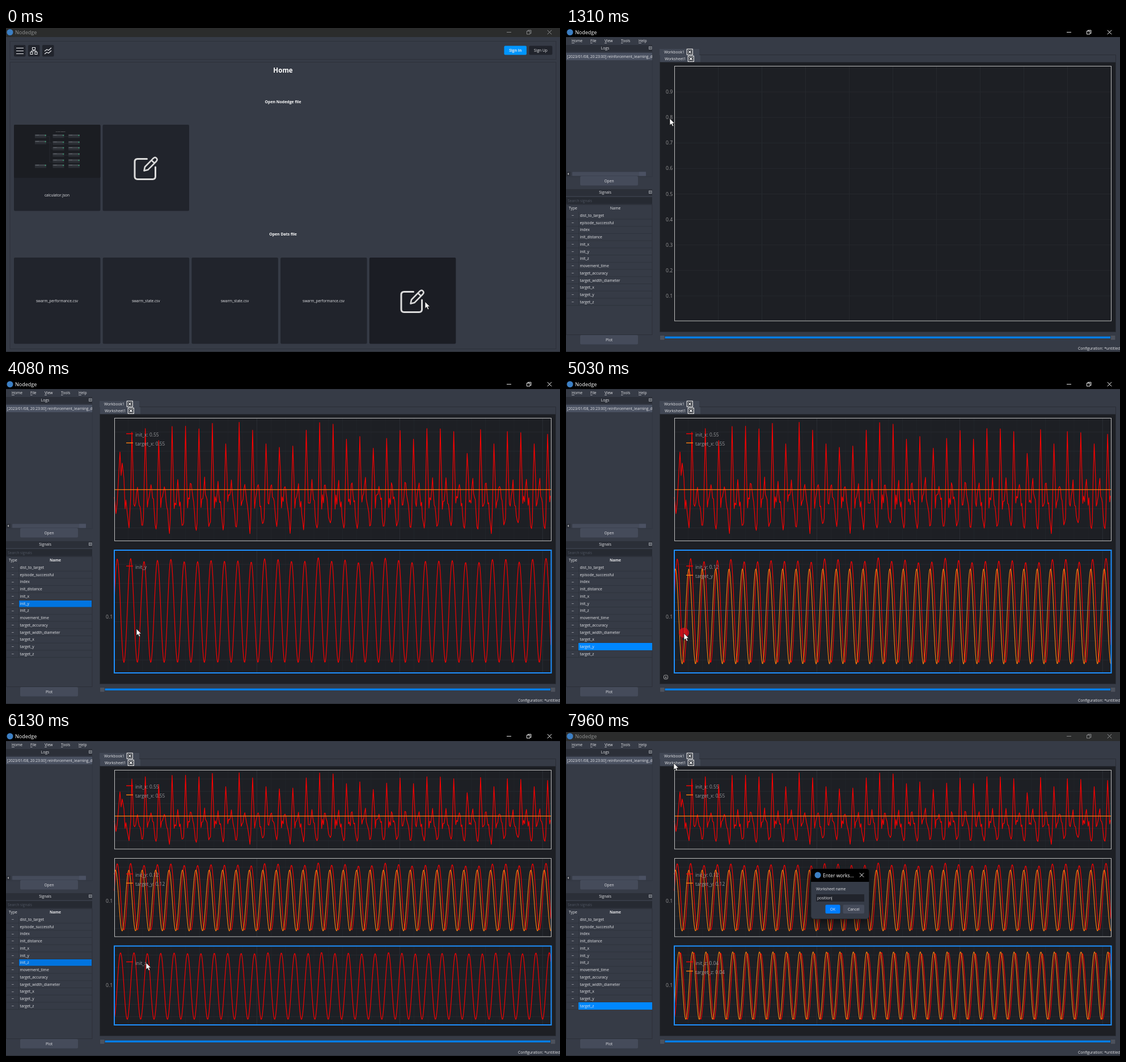
An HTML page for the animation above (8000 ms loop, 977x573 px).

```html
<!DOCTYPE html>
<html lang="en">
<head>
<meta charset="utf-8">
<title>Nodedge</title>
<style>
html, body { margin: 0; width: 100%; height: 100%; overflow: hidden; background: #363b46; }
svg { display: block; font-family: "Open Sans", "Noto Sans", sans-serif; }
text { white-space: pre; }
</style>
</head>
<body>
<svg id="stage" width="977" height="573" viewBox="0 0 977 573"></svg>
<script>
const LOOP = 8000, BG = '#363b46', CARD = '#21242c', BTN = '#454b5a', INK = '#e4e5e8', BLUE = '#1e90ff';

// Markup helpers
const rect = (x, y, w, h, fill, more = '') => `<rect x="${x}" y="${y}" width="${w}" height="${h}" fill="${fill}" ${more}/>`;
const text = (x, y, s, size, fill = INK, more = '') =>
  `<text x="${x}" y="${y + size * 0.36}" font-size="${size}" fill="${fill}" ${more}>${s}</text>`;
const mid = (x, y, s, size, fill, more = '') => text(x, y, s, size, fill, 'text-anchor="middle" ' + more);
const line = (d, color = INK, w = 1, more = '') => `<path d="${d}" fill="none" stroke="${color}" stroke-width="${w}" ${more}/>`;
const fill = (d, color) => `<path d="${d}" fill="${color}"/>`;
const dot = (x, y, r, color, more = '') => `<circle cx="${x}" cy="${y}" r="${r}" fill="${color}" ${more}/>`;
const frame = (x, y, w, h, color, w2 = 1, bg = 'none', r = 0) =>
  rect(x, y, w, h, bg, `stroke="${color}" stroke-width="${w2}" rx="${r}"`);
const button = (x, y, w, h, s, bg = BTN, more = '') =>
  rect(x, y, w, h, bg, 'rx="2"') + mid(x + w / 2, y + h / 2, s, 6.7, INK, more);
const cross = (x, y, r, color, w = 1) => line(`M${x - r} ${y - r}l${2 * r} ${2 * r}m0 ${-2 * r}l${-2 * r} ${2 * r}`, color, w);
const range = n => [...Array(n).keys()];
const BOLD = 'font-weight="700"';

function random(seed) {
  return () => (seed = (seed * 16807) % 2147483647) / 2147483647;
}

// Home page
function pen(x, y) {
  return `<g transform="translate(${x} ${y})">` +
    line('M23 4.5H6.5Q1.5 4.5 1.5 9.5V35.5Q1.5 40.5 6.5 40.5H33Q38 40.5 38 35.5V19', '#dcdcdc', 3, 'stroke-linecap="round"') +
    line('M18 25.5L19.5 18.5L34.5 3.2Q37.5 0.7 39.8 3.2Q42.2 5.8 39.8 8.5L24.8 23.8ZM31 7L36.5 12', '#dcdcdc', 2.6, 'stroke-linejoin="round"') + '</g>';
}

function thumb() {
  const node = (x, y) => rect(x, y - 2.5, 20, 6, '#2b2e34') + rect(x, y - 2.5, 20, 2.2, '#44484f') +
    dot(x + 18.5, y - 1, 0.9, '#2fae74') + text(x + 1.5, y - 1.3, 'Input', 2.2, '#a5a8ae');
  const ys = [191, 203, 213, 224, 235, 244];
  return rect(14, 171, 152.5, 94, '#1b1d22', 'rx="2"') + mid(96, 183, 'Calculator example', 1.9, '#c8c8c8') +
    line('M72 192H77V237H83M72 203H80V214H83M103 192H110M103 204H110M103 225H110', '#33363c', 0.5) +
    [191, 202, 244].map(y => node(51, y)).join('') + ys.map(y => node(82.5, y) + node(110, y)).join('');
}

function home() {
  let s = rect(0, 16, 977, 557, BG);
  s += frame(7, 23.5, 963, 32, '#2d313a', 1) + frame(7, 60.5, 963, 507, '#2d313a', 1);
  s += [14, 39, 64].map(x => rect(x, 30, 20.5, 20.5, CARD, 'rx="2"')).join('');
  s += line('M18 35.5H31M18 40.5H31M18 45.5H31', INK, 1.2);
  s += line('M46.5 34.5h5v4h-5zM43 42.5h4v4h-4zM51 42.5h4v4h-4zM49 38.5v2M45 42.5v-2h8v2', INK, 1.1);
  s += line('M68 41l4-3 3 1.5 5-4.5M68 46l4-3 3 1.5 5-4.5', INK, 1.2);
  s += button(878.5, 31.5, 39.5, 16, 'Sign In', '#0096ff', BOLD) + button(922.5, 31.5, 41, 16, 'Sign Up', CARD);
  s += mid(488.5, 74.5, 'Home', 11.6, '#fff', BOLD);
  s += mid(488.5, 130, 'Open Nodedge file', 6.95, '#fff', BOLD) + mid(488.5, 365, 'Open Dats file', 6.9, '#fff', BOLD);
  s += [14, 170.5].map(x => rect(x, 171, 152.5, 152.5, CARD, 'rx="2"')).join('');
  s += thumb() + mid(90, 295.5, 'calculator.json', 6.5) + pen(225.5, 227);
  ['swarm_performance.csv', 'swarm_state.csv', 'swarm_state.csv', 'swarm_performance.csv', ''].forEach((name, i) => {
    const x = 14 + i * 156.7;
    s += rect(x, 406, 152.5, 152.5, name ? CARD : '#1b1d24', 'rx="2"') + mid(x + 76, 483, name, 6.5);
  });
  return s + pen(695.5, 462) + rect(0, 572, 977, 1, '#272a31');
}

// Data window
const SIGNALS = ['dist_to_target', 'episode_successful', 'index', 'init_distance', 'init_x', 'init_y', 'init_z',
  'movement_time', 'target_accuracy', 'target_width_diameter', 'target_x', 'target_y', 'target_z'];

function shell() {
  let s = rect(0, 16, 977, 557, BG);
  [[10, 'Home'], [43, 'File'], [68, 'View'], [97, 'Tools'], [128, 'Help']].forEach(([x, m]) => {
    s += text(x, 23, `<tspan text-decoration="underline">${m[0]}</tspan>${m.slice(1)}`, 6.7);
  });
  [[36, 'Logs'], [291, 'Signals']].forEach(([y, name]) => {
    s += rect(0, y - 6, 152, 12, '#2b2f38') + mid(69, y, name, 6.7) +
      frame(146.5, y - 3, 4.5, 4.5, '#b5b8be', 0.8) + cross(148.7, y - 0.7, 1, '#b5b8be', 0.7);
  });
  s += frame(0.5, 43, 151.5, 220, '#313640', 0.8);
  s += rect(0, 254, 8, 8, '#2d313a') + fill('M5 256v4l-2.5-2z', '#bbb') + rect(11, 254.5, 130, 7, BTN, 'rx="1"') + rect(129, 254.5, 12, 7, '#4b5162');
  s += button(25, 262, 102, 16.5, 'Open') + rect(0, 299, 152, 12.5, '#262a32') + text(3, 305.5, 'Search signals', 6.5, '#4f5561');
  s += frame(0.5, 312.5, 151.5, 230, '#2c3039', 1) + button(25, 543, 102, 16.5, 'Plot');
  s += rect(165, 37, 70, 11, '#414754') + text(173, 42.5, 'Workbook1', 6.7) + rect(166, 48, 71, 12, '#414754') + text(174, 54.5, 'Worksheet1', 6.7);
  [[218.3, 42.3], [220.3, 54.5]].forEach(([x, y]) => { s += frame(x - 5, y - 5, 10, 10, '#e8e8e8', 1.2, '#33373f') + cross(x, y, 2.5, '#fff', 1.2); });
  s += line('M235 47.5H969.5V537', '#2a2e36') + rect(165.5, 60.5, 804, 477, '#1d1f24', 'stroke="#2a2e36"');
  s += rect(174, 545.5, 787, 3.5, '#007de6');
  s += [165, 960].map(x => frame(x + 0.5, 543.5, 8.5, 8.5, '#343943', 1, '#4d525d')).join('');
  return s + rect(0, 572, 977, 1, '#272a31');
}

function table(sel, strong) {
  let s = text(5, 319, 'Type', 6.7) + mid(87, 319, 'Name', 6.7, INK, sel ? BOLD : '') + line('M22.5 325V490', '#2d313a', 0.8);
  SIGNALS.forEach((name, i) => {
    const y = 331.6 + i * 12.72, top = Math.round(y - 6.5);
    s += line(`M0 ${y + 6.4}H152`, '#2d313a', 0.8);
    if (name === sel) s += strong ? rect(22, top, 130, 13, '#0087ff') : rect(23, top + 1, 128, 11.5, '#0074e0');
    s += mid(12, y, '~', 7.5) + text(24.5, y, name, 6.75);
  });
  return s;
}

// Curves in unit height; x in pixels
const PEAKS = [119, 106, 150, 98, 97, 107, 87, 162, 83, 112, 162, 175, 170, 112, 84, 90,
  145, 135, 178, 142, 113, 145, 106, 107, 117, 197, 110, 162, 117, 121, 162, 127];
// Rest of a period: offset, height, spread
const TAIL = [[2.2, 290, 15], [3.6, 388, 15], [5, 370, 22], [6.8, 365, 22], [8.4, 325, 22], [10, 302, 20], [11.4, 345, 20],
  [13, 375, 20], [14.4, 378, 20], [15.8, 420, 15], [17.4, 455, 12], [19, 470, 22], [20.4, 445, 12], [21.8, 300, 15]];

function spikes() {
  const rnd = random(41);
  const pts = [[191, 357], [194, 418], [196, 380], [201, 192], [203, 278], [205, 233], [208, 290], [210, 400], [211.5, 368], [214, 420], [217, 470], [220, 350]];
  PEAKS.forEach((top, i) => {
    const x = 222 + 23.65 * i;
    pts.push([x, top]);
    TAIL.forEach(([dx, y, n]) => pts.push([x + dx, y + (rnd() * 2 - 1) * n]));
  });
  return pts.filter(p => p[0] <= 961).map(([x, y]) => [x, (y - 67) / 451]);
}

function wave(peak, top, low, vary) {
  const rnd = random(7), tops = range(40).map(() => top + rnd() * vary);
  return range(771).map(i => {
    const a = (191 + i - peak) / 23.63, hi = tops[Math.round(a) + 2];
    return [191 + i, (hi + low) / 2 - (low - hi) / 2 * Math.cos(a * 2 * Math.PI)];
  });
}

const RED = '#ff0000', ORANGE = '#ff7f0e';
const CURVES = {
  init_x: spikes(), target_x: [[191, 0.583], [961, 0.583]],
  init_y: wave(196.2, 0.058, 0.915, 0.045), target_y: wave(193, 0.152, 0.927, 0),
  init_z: wave(202, 0.08, 0.93, 0.02), target_z: wave(199.5, 0.074, 0.93, 0)
};
const BOXES = [[[67, 451]], [[67, 217.5], [301, 217]], [[67, 140], [223, 139], [378.5, 139.5]]];

function plot(axis, top, h, legends, active) {
  let s = '';
  for (let x = 215.5, i = 0; x < 961; x += 25.2, i++) s += line(`M${x} ${top}v${h}`, i % 10 === 9 ? '#2b2e35' : '#212429', 1);
  range(6).forEach(i => { s += line(`M191 ${top + h * (0.115 + 0.156 * i)}H961`, '#26292f', 1); });
  legends.forEach(([name], i) => {
    const d = CURVES[name].map(([x, y]) => x.toFixed(1) + ' ' + (top + y * h).toFixed(1)).join('L');
    s += line('M' + d, i ? ORANGE : RED, 1.15, 'stroke-linejoin="round"');
  });
  s += active ? frame(191, top, 770.5, h, BLUE, 2) : frame(191.5, top + 0.5, 770, h - 0.5, '#bcbcbc', 1);
  legends.forEach(([name, val], i) => {
    const y = top + 28 + i * 16.3;
    s += line(`M212 ${y}h12`, i ? ORANGE : RED, 1.4) + text(228, y + 2, name + (val ? ': ' + val : ''), 8.4, '#96979b');
  });
  if (axis !== 'x') s += text(176, top + h * (axis === 'y' ? 0.545 : 0.5), '0.1', 8.6, '#969696');
  return s;
}

function emptyPlot() {
  let s = '';
  range(9).forEach(i => {
    const y = 113.1 + i * 45.1;
    s += line(`M${268.5 + i * 77} 68V517M192 ${y}H961`, '#25282d') + text(176, y, (0.9 - i / 10).toFixed(1), 8.6, '#969696');
  });
  return s + frame(191.5, 67.5, 770, 450.5, '#bcbcbc', 1);
}

// Each axis: [init shown, init value, target shown, target value]
const STEPS = { x: [2120, 2520, 2860, 3190, '0.55'], y: [4010, 4150, 4770, 5100, '0.12'], z: [5850, 6200, 6550, 7340, '0.04'] };

function plots(t) {
  const shown = Object.keys(STEPS).filter(k => t >= STEPS[k][0]);
  if (!shown.length) return emptyPlot();
  return shown.map((k, i) => {
    const [a, b, c, d, val] = STEPS[k], [top, h] = BOXES[shown.length - 1][i];
    const legends = [['init_' + k, t >= b && val]];
    if (t >= c) legends.push(['target_' + k, t >= d && val]);
    return plot(k, top, h, legends, i === shown.length - 1);
  }).join('');
}

function titleBar(active) {
  const c = active ? '#fff' : '#8f9091';
  return rect(0, 0, 977, 16, active ? '#000' : '#2b2c2c') + dot(7, 7.5, 5.5, '#3c7fc4') + text(16, 8, 'Nodedge', 9, c) +
    line('M883 7.5h8', c, 0.9) + line('M918.5 5.5h5.5v5.5h-5.5zM920.5 5.5v-1.5h5.5v5.5h-1.5', c, 0.9) + cross(958.5, 7.5, 3.7, c, 1);
}

// File dialog
const folder = (x, y) => fill(`M${x} ${y - 5}h4.5l1.5 1.5h5.5v8h-11.5z`, '#e0a52c') + rect(x, y - 2.5, 11.5, 6.5, '#ffd768', 'rx=".6"');
const chev = (x, y, r = 3, c = '#ccc') => line(`M${x - r} ${y - r / 2}l${r} ${r}l${r} ${-r}`, c, 1);

function sideIcon(kind, y) {
  const x = 35;
  if (kind === 'desk') return rect(x, y - 4.5, 12, 9, '#2f9be0', 'rx="1"') + rect(x + 1, y + 2, 10, 1.2, '#a8dcff');
  if (kind === 'down') return line(`M41 ${y - 5}v8m-3.5-3.5l3.5 3.5l3.5-3.5M37 ${y + 5.5}h8`, '#3d9fe8', 1.1);
  if (kind === 'doc') return rect(x + 1, y - 5.5, 9.5, 11, '#c3ccd3') + line(`M38 ${y - 3}h5.5m-5.5 2.5h5.5m-5.5 2.5h5.5`, '#66788a', 1);
  if (kind === 'pic') return rect(x, y - 5.5, 11, 11, '#2b8fdc') + fill(`M35 ${y + 5.5}l5-6 6 6z`, '#e3f3ff') + dot(43, y - 2, 1.3, '#fff');
  if (kind === 'disk') return rect(x, y - 4, 11, 4, '#d9b684') + rect(x, y, 12, 4.5, '#a9aeb3') + dot(44.5, y + 2.3, 1, '#46c25b');
  return folder(x, y);
}

function fileDialog(stage, hover) {
  const W = '#e8e8e8', G = '#454545', z = 8.7;
  let s = `<g filter="url(#shade)">${rect(5, 17, 478, 361, '#191919', 'rx="5"')}</g>`;
  s += fill('M5 40V22q0-5 5-5H478q5 0 5 5V40z', '#000') + dot(17, 28, 5.5, '#3c7fc4') + text(26, 28.5, 'Open file', z, '#fff') + cross(470.5, 28, 3.7, '#fff');
  s += rect(5, 78, 478, 23.5, '#202020') + fill('M5 314H483V373q0 5-5 5H10q-5 0-5-5z', '#363636');
  s += line('M27 58.5h-9.5m4-4l-4 4l4 4M44 58.5h9.5m-4-4l4 4l-4 4M95.5 63.5v-9.5m-4 4l4-4l4 4', '#ddd', 1.1) + chev(72, 58);
  s += frame(111.5, 45.5, 204, 27, G) + frame(322.5, 45.5, 154, 27, G) + folder(118, 58.5);
  s += text(134, 58, '«', 8, '#aaa') + text(144, 58.5, stage ? 'exam...' : 'node...', z, W) + text(189, 58.5, stage ? 'csv_...' : 'exam...', z, W);
  s += line('M178 55.5l2.5 2.5l-2.5 2.5M225 55.5l2.5 2.5l-2.5 2.5', '#ddd') + chev(273, 58.5, 4);
  s += line('M304.5 55.5a4.5 4.5 0 1 0 1 4M305 53v3h-3', '#ddd', 1.1) + line('M334 62l3-3.5M337 58a3 3 0 1 1 3 1.5', '#aaa', 0.9) + text(353, 58.5, 'Search examples', z, '#8d8d8d');
  s += text(20, 90, 'Organise', z, W) + fill('M59.5 88.5h5l-2.5 2.5z', '#ccc') + text(87, 90, 'New folder', z, W);
  s += frame(393, 83.5, 12, 11, '#ddd', 1, '#555') + line('M393 86.5h12m-12 3h12m-12 3h12', '#ddd', 0.8) + fill('M411 88h5l-2.5 2.5z', '#ccc');
  s += rect(432, 85, 11.5, 9, '#f0f0f0') + rect(438.5, 86, 4, 7, '#2f7fc9') + dot(465, 89, 6, '#0a84e0') + mid(465, 89.2, '?', 8.5, '#fff', BOLD);
  s += rect(7, 111, 104, 21, '#333') + chev(17, 122, 3, '#eee');
  s += fill('M35 116l1.8 4 4.2.4-3.2 2.9 1 4.3-3.8-2.3-3.8 2.3 1-4.3-3.2-2.9 4.2-.4z', '#ffc83d') + text(43, 122.5, 'Quick access', z, W);
  [['Desktop', 'desk'], ['Downloads', 'down'], ['Documents', 'doc'], ['Pictures', 'pic'], ['Kodrel', ''], ['git', ''], ['DFS (G:)', 'disk']].forEach(([n, k], i) => {
    const y = 146.5 + i * 24.4;
    s += sideIcon(k, y) + text(49.5, y + 0.5, n, z, W) +
      fill(`M105 ${y - 4}l4 4-2 .5-1.5 3-2-1.5-2.5 2.5 1.5-3-1.5-2 3-1.5z`, '#9a9a9a');
  });
  s += rect(35, 312, 5, 2, '#e0a52c') + rect(115.5, 115, 5.5, 57, '#777') + line('M127 102V314', '#2e2e2e');
  s += text(151, 113.5, 'Name', z, W) + line('M251 105.5l2.5-2.5l2.5 2.5', '#aaa', 0.8) + line('M361.5 102V124', '#444') + text(366, 113.5, 'Date modified', z, W);
  const rows = [
    [['calculator', '12/01/2023 09:28'], ['csv_analyzer', '12/01/2023 09:28'], ['gravitational_force', '08/01/2023 20:23'], ['swarm', '15/01/2023 13:27'], ['tdms_analyzer', '07/01/2023 17:34']],
    [],
    [['example.csv', '12/01/2023 09:28'], ['reinforcement_learning_data.csv', '08/01/2023 20:23']]
  ][stage];
  rows.forEach(([n, d], i) => {
    const y = 139 + i * 23.95;
    if (i === hover) s += rect(138, y - 11.5, 345, 23, '#333');
    s += stage ? rect(143, y - 6, 8.5, 11, '#dfe3e6') + rect(145, y - 2, 4.5, 4.5, '#3c9a5f') : folder(142, y - 0.5);
    s += text(156.5, y + 0.3, n, z, W) + text(366, y + 0.3, d, 8.95, '#cfcfcf');
  });
  s += line('M141 300.5H469', '#252525') + rect(141, 304.5, 217, 6, '#9c9c9c');
  s += text(140, 336, 'File name:', z, W, 'text-anchor="end"') + frame(144.5, 327.5, 172, 17, '#c8c8c8', 1, '#2e2e2e') + line('M147 330.5v11', '#fff', 0.8) + chev(310, 336);
  s += frame(326.5, 327.5, 143, 16.5, '#777', 1, '#383838') + text(329, 336, 'All files (*)', z, W) + chev(462.5, 336);
  s += frame(326.5, 349.5, 66, 18, '#e8e8e8', 1, '#333', 2) + mid(359.5, 358.8, 'Open', z, W) + frame(403.5, 349.5, 65.5, 18, '#8a8a8a', 1, '#333', 2) + mid(436, 358.8, 'Cancel', z, W);
  [[0, 0], [-2.5, 0], [-5, 0], [0, -2.5], [-2.5, -2.5], [0, -5]].forEach(([x, y]) => { s += rect(479.5 + x, 374.5 + y, 1.5, 1.5, '#ccc'); });
  return s + rect(5.5, 17.5, 477, 360, 'none', 'rx="5" stroke="#3c3c3c" stroke-width=".8"');
}

function askDialog(typed) {
  const s = `<g filter="url(#shade)">${rect(432, 242, 102.5, 88.5, BG, 'rx="5" stroke="#23262c"')}</g>` +
    fill('M432 265V247q0-5 5-5H529.5q5 0 5 5V265z', '#000') + dot(444, 253, 5.5, '#3c7fc4') + text(453, 253.5, 'Enter works...', 8.6, '#fff') + cross(521.5, 253, 3.6, '#fff');
  return s + text(441, 277.5, 'Worksheet name', 6.6) + rect(441, 287, 85, 13, CARD) +
    text(443, 293.7, typed + '<tspan fill="#fff" dx="-1.2">|</tspan>', 6.7) +
    button(457.5, 305.5, 26, 15.5, 'OK', '#007dff') + button(488.5, 305.5, 37.5, 15.5, 'Cancel');
}

// Auto-range badge and guide line of the hovered plot
function hoverMarks() {
  return line('M192 407.5H960', '#3b72b8', 1, 'opacity=".6"') + frame(172.5, 522, 7, 7, '#bbb', 0.8, 'none', 2) + mid(176, 525.6, 'A', 5.5, '#ddd');
}

// Pointer path: time, x, y
const PATH = [[130, 739, 484], [450, 216, 257], [550, 216, 257], [720, 183, 160], [1710, 183, 160], [1900, 45, 380], [2120, 283, 300],
  [2450, 283, 300], [2650, 45, 464], [2860, 283, 360], [3190, 283, 360], [3500, 45, 393], [3940, 230, 440], [4080, 230, 440],
  [4430, 45, 469], [4770, 208, 448], [5100, 208, 448], [5400, 45, 406], [5850, 247, 408], [6200, 247, 408], [6360, 45, 482],
  [6550, 240, 425], [7340, 240, 425], [7480, 190, 55]];
const PICKS = [[1900, 'init_x'], [2650, 'target_x'], [3500, 'init_y'], [4430, 'target_y'], [5400, 'init_z'], [6360, 'target_z']];

function pointer(t) {
  const i = PATH.findIndex(p => p[0] > t);
  if (i === 0) return PATH[0].slice(1);
  if (i < 0) return PATH[PATH.length - 1].slice(1);
  const [t0, x0, y0] = PATH[i - 1], [t1, x1, y1] = PATH[i];
  const u = (t - t0) / (t1 - t0), e = u * u * (3 - 2 * u);
  return [x0 + (x1 - x0) * e, y0 + (y1 - y0) * e];
}

const stage = document.getElementById('stage');
const layers = ['page', 'list', 'plots', 'title', 'dialog', 'ask', 'auto'];
stage.innerHTML = '<defs><filter id="shade" x="-20%" y="-20%" width="140%" height="150%"><feDropShadow dx="0" dy="5" stdDeviation="7" flood-color="#000" flood-opacity=".55"/></filter></defs>' +
  layers.map(id => `<g id="${id}"></g>`).join('') + dot(208, 447, 9, '#e0101c', 'id="press" opacity=".75"') +
  '<path id="arrow" d="M0 0V12L2.8 9.5L4.8 14L6.9 13L4.9 8.8H8.6Z" fill="#fff" stroke="#111" stroke-width=".7"/>';

const cache = {};
function put(id, key, make) {
  if (cache[id] === key) return;
  cache[id] = key;
  document.getElementById(id).innerHTML = key === '' ? '' : make();
}

function draw(t) {
  const atHome = t < 200, dialog = t >= 270 && t < 1170, loaded = t >= 1240, ask = t >= 7480;
  const [x, y] = pointer(t);
  put('page', atHome ? 'home' : 'data', atHome ? home : shell);

  const pick = PICKS.filter(p => t >= p[0]).pop(), sel = pick ? pick[1] : '';
  put('list', atHome ? '' : loaded + sel, () => (loaded ?
    rect(0, 44, 152, 13, '#4a5161') + '<svg width="152" height="573">' + text(2, 50.5, '[2023/01/08, 20:23:00] reinforcement_learning_data.csv', 6.65) + '</svg>' +
    table(sel, /^target_[yz]$/.test(sel)) : '') +
    text(977, 567, loaded ? 'Configuration: *untitled' : 'Configuration: ', 6.7, INK, 'text-anchor="end"'));

  const phase = Object.values(STEPS).flat().filter(v => typeof v === 'number' && t >= v).length;
  put('plots', atHome ? '' : 'p' + phase, () => plots(t));
  const active = loaded && !ask;
  put('title', 'a' + active, () => titleBar(active));

  const level = t < 830 ? 0 : t < 970 ? 1 : 2;
  const hover = t > 600 && y < 247 ? Math.floor((y - 127) / 23.95) : -1;
  put('dialog', dialog ? level + ':' + hover : '', () => fileDialog(level, hover));
  const typed = 'position'.slice(0, Math.max(0, Math.ceil((t - 7550) / 410 * 8)));
  put('ask', ask ? 'q' + typed : '', () => askDialog(typed));
  put('auto', t >= 4770 && t < 5100 ? 'on' : '', hoverMarks);

  document.getElementById('press').style.display = t >= 5030 && t < 5100 ? '' : 'none';
  document.getElementById('arrow').setAttribute('transform', `translate(${x.toFixed(1)} ${y.toFixed(1)})`);
}

const start = performance.now();
function tick() {
  draw((performance.now() - start) % LOOP);
  requestAnimationFrame(tick);
}
draw(0);
requestAnimationFrame(tick);
</script>
</body>
</html>
```
